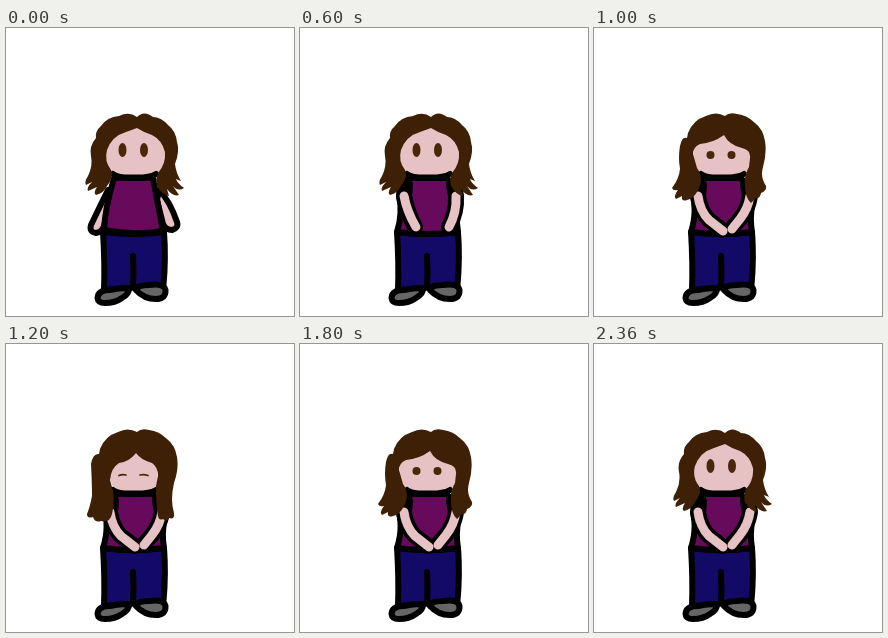
An HTML page without scripts for the animation above (2600 ms loop, 288 px wide and 288 px high).

```html
<!DOCTYPE html>
<html lang="en">
<head>
<meta charset="utf-8">
<title>Shy girl</title>
<style>
  html, body { margin: 0; width: 100%; height: 100%; overflow: hidden; background: #fff; }
  svg { display: block; width: 100vw; height: 100vh; }

  .line { stroke: #000; stroke-width: 6; stroke-linejoin: round; stroke-linecap: round; fill: none; }
  .shirt { fill: #670a5b; }
  .jeans { fill: #130a68; }
  .shoe { fill: #666; }
  .skin { fill: #e6c2c4; }
  .hair { fill: #3d2005; }
  .eye { fill: #4a270b; }
  .lids { fill: none; stroke: #4a270b; stroke-width: 1.7; stroke-linecap: round; }
  .limb { fill: none; stroke-linecap: round; stroke-linejoin: round; }
  .edge { stroke: #000; stroke-width: 16; }
  .arm { stroke: #e6c2c4; stroke-width: 9; }

  /* Poses swap without blending: 2600 ms loop */
  .pose { visibility: hidden; animation: 2600ms step-end infinite; }
  .hang { animation-name: hang; }
  .fold { animation-name: fold; }
  .lift { animation-name: lift; }
  .clasp { animation-name: clasp; }
  .up { animation-name: up; }
  .dip { animation-name: dip; }
  .bow { animation-name: bow; }
  @keyframes hang { 0% { visibility: visible; } 23.07%, 100% { visibility: hidden; } }
  @keyframes fold { 0% { visibility: hidden; } 23.07%, 100% { visibility: visible; } }
  @keyframes lift { 0% { visibility: hidden; } 23.07% { visibility: visible; } 30.76%, 100% { visibility: hidden; } }
  @keyframes clasp { 0% { visibility: hidden; } 30.76%, 100% { visibility: visible; } }
  @keyframes up { 0% { visibility: visible; } 38.46% { visibility: hidden; } 76.92%, 100% { visibility: visible; } }
  @keyframes dip {
    0% { visibility: hidden; } 38.46% { visibility: visible; } 46.15% { visibility: hidden; }
    69.23% { visibility: visible; } 76.92%, 100% { visibility: hidden; }
  }
  @keyframes bow { 0% { visibility: hidden; } 46.15% { visibility: visible; } 69.23%, 100% { visibility: hidden; } }
</style>
</head>
<body>
<svg viewBox="0 0 288 288">
  <defs>
    <path id="collar" class="line" d="M107 146 Q112 150 128 149.500 Q143 150 150 146"/>
  </defs>

  <!-- Legs and shoes -->
  <path class="line jeans" d="M97 204 Q128 208 158 204 Q160 230 157.500 257 L131 259 L124 260 L98 262 Q99 235 97 204Z"/>
  <path class="line" d="M127 228 Q128 244 127 259"/>
  <path class="line shoe" d="M91.500 270 Q92 262 104 262 Q116 259 123 261 Q123 266 116 270 Q109 275 99 275 Q92 275 91.500 270Z"/>
  <path class="line shoe" d="M130 262 Q131 257 143 257 Q158 255 159.500 262 Q160 271 150 271 Q138 271 130 262Z"/>

  <!-- Arms at the sides -->
  <g class="pose hang">
    <path class="line skin" d="M102 162 Q94 178 85 197 Q83 204 90 205 Q96 204 98 198 L104 174Z"/>
    <path class="line skin" d="M153 162 Q164 173 171 194 Q173 200 166 202 Q160 202 157 196 L151 172Z"/>
    <path class="line shirt" d="M108 150 L147 150 Q152 176 157 203 Q128 208 98 202 Q99 180 108 150Z"/>
  </g>

  <!-- Arms in front: lifted, then hands together -->
  <g class="pose fold">
    <path class="line shirt" d="M108 150 L147 150 L160 167 Q155 186 158 204 Q128 208 97 204 Q103 185 99 168Z"/>
  </g>
  <g class="pose lift limb">
    <path class="edge" d="M105 157 L104 168 Q107 184 115 199 M154 157 L156 168 Q157 184 149 199"/>
    <path class="arm" d="M104 168 Q107 184 116 199 M156 168 Q157 184 149 199"/>
  </g>
  <g class="pose clasp limb">
    <path class="edge" d="M105 157 L104 168 Q106 183 115 192 L128 202 M154 157 L156 168 Q154 181 146 191 L137 201"/>
    <path class="arm" d="M104 168 Q106 183 115 192 L129 203 M156 168 Q154 181 146 191 L138 201"/>
  </g>

  <!-- Head raised -->
  <g class="pose up">
    <path class="skin" d="M101 108 Q130 90 158 108 L160 130 Q157 144 147 148 L110 148 Q99 140 99 125Z"/>
    <use href="#collar"/>
    <path class="hair" d="M131 89 Q123 83 113 88 Q101 89 95 98 Q89 103 90 110 Q83 118 85 128 Q87 138 82 148
      Q78 154 80 157 L86 154 Q80 160 82 163 L91 159 Q87 165 90 167 Q98 165 101 158 Q108 149 105 142
      Q98 133 101 122 Q106 108 120 104 L131 100 Q137 104 146 107 Q156 112 159 124 Q160 136 152 145
      Q149 151 151 158 Q156 167 163 168 L161 161 Q167 169 173 167 L167 158 Q172 164 178 160
      Q171 155 170 151 L175 153 Q170 145 169 136 Q174 123 171 114 Q170 103 162 97 Q155 89 147 89 Q138 82 131 89Z"/>
    <ellipse class="eye" cx="116.500" cy="122" rx="4" ry="7"/>
    <ellipse class="eye" cx="138" cy="122" rx="4" ry="7"/>
  </g>

  <!-- Head lowered a little -->
  <g class="pose dip">
    <path class="skin" d="M101 112 L131 103 L156 118 L157 136 Q154 145 147 147 L110 147 Q102 143 99 130Z"/>
    <use href="#collar"/>
    <path class="hair" d="M131 88 Q122 83 112 88 Q99 92 94 105 L93 110 Q88 108 86 118 Q84 130 86 141 Q85 151 78 160
      Q79 163 84 162 Q79 168 82 171 L88 168 Q87 174 93 172 Q103 170 107 153 Q107 145 103 140
      L99 126 Q99 119 106 116 Q119 115 130 107 Q135 117 148 120 Q157 122 156 130 L155 139
      Q150 147 151 157 Q151 170 157 175 L162 170 Q166 171 167 165 Q173 163 172 158 Q166 149 169 139
      Q173 125 171 113 Q169 101 161 95 Q153 87 143 86 Q135 84 131 88Z"/>
    <circle class="eye" cx="116.500" cy="127" r="4"/>
    <circle class="eye" cx="137.500" cy="127" r="4"/>
  </g>

  <!-- Head bowed, eyes shut -->
  <g class="pose bow">
    <path class="skin" d="M104 118 L131 106 L150 118 L152 136 Q151 144 146 147 L111 147 Q106 144 104 134Z"/>
    <use href="#collar"/>
    <path class="hair" d="M131 88 Q122 83 112 88 Q99 92 94 105 L93 110 Q87 109 85 120 Q86 140 86 152 Q84 163 81 170
      Q81 175 87 173 Q89 179 95 177 Q104 179 106 170 Q109 158 107 147
      L104 136 Q105 124 113 119 Q123 118 130 109 Q135 116 146 119 Q152 123 152 132 L150 142
      Q150 160 152 172 Q153 177 157 175 Q161 179 163 174 Q169 176 168 169 Q164 156 168 139
      Q173 125 171 113 Q169 101 161 95 Q153 87 143 86 Q135 84 131 88Z"/>
    <path class="lids" d="M113 131.500 Q116 130 120 131 M134 131 Q138 130 142 131.500"/>
  </g>
</svg>
</body>
</html>
```
